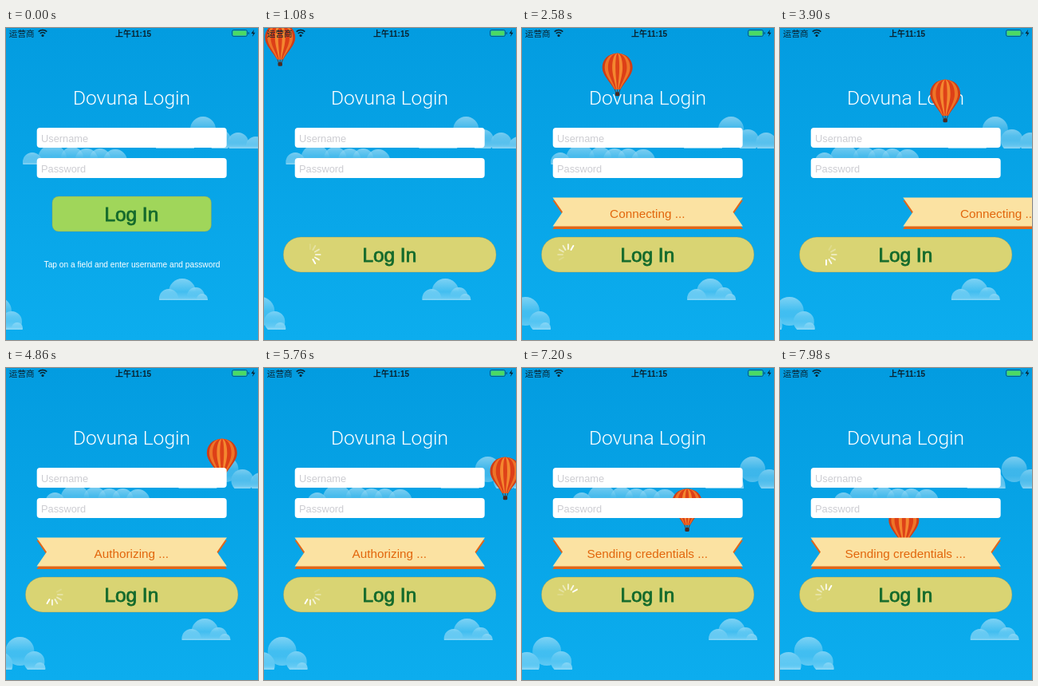
An HTML page with a canvas that plays this animation: 316 by 391 pixels, repeating every 8 s.

```html
<!DOCTYPE html>
<html lang="en">
<head>
<meta charset="utf-8">
<title>Login animation</title>
<style>
  html, body { margin: 0; width: 100%; height: 100%; overflow: hidden; background: #05a3e5; }
  canvas { display: block; }
</style>
</head>
<body>
<canvas id="stage" width="316" height="391"></canvas>
<script>
const ctx = document.getElementById('stage').getContext('2d');
const W = 316, H = 391, LOOP = 8;
const SANS = '"Liberation Sans", Arial, sans-serif';
const CJK = '"Noto Sans CJK SC", "Noto Sans CJK", sans-serif';

const TAP = 0.15;          // login button is pressed
const RATE = 1 / 0.9;      // playback speed of the interface
const FIRST_MESSAGE = 1.66;
const FLIP = 0.3, HOLD = 1.818, EXIT = 0.3;
const MESSAGES = ['Connecting ...', 'Authorizing ...', 'Sending credentials ...'];

// Clouds: baseline, top, and bumps as [x, y, radius]
const CLOUDS = [
  { base: 151, top: 111, bumps: [[212, 149, 24], [247, 127, 16], [268, 141, 14], [291, 144, 13], [313, 148, 12], [334, 150, 12]] },
  { base: 171, top: 146, bumps: [[33, 168, 12], [58, 164, 18], [83, 163, 14], [101, 165, 14], [118, 164, 13], [137, 167, 15]] },
  { base: 341, top: 314, bumps: [[204, 339, 12], [221, 331, 17], [238, 336, 11], [246, 340, 7]] },
  { base: 378, top: 337, bumps: [[-36, 372, 16], [-11, 355, 18], [7, 368, 13], [14, 376, 7]] }
];
const CLOUD_SPEED = 5.85;

const clamp = v => Math.max(0, Math.min(1, v));
const mix = (a, b, p) => a + (b - a) * p;
const smooth = p => p * p * (3 - 2 * p);

function spring(time, damping, duration) {
  if (time <= 0) return 0;
  const decay = 6.9 / duration;
  const freq = decay / damping * Math.sqrt(1 - damping * damping);
  return 1 - Math.exp(-decay * time) * (Math.cos(freq * time) + decay / freq * Math.sin(freq * time));
}

function text(str, x, y, font, color, align = 'left') {
  ctx.font = font;
  ctx.fillStyle = color;
  ctx.textAlign = align;
  ctx.fillText(str, x, y);
}

function box(x, y, w, h, r, fill, stroke) {
  ctx.beginPath();
  ctx.roundRect(x, y, w, h, r);
  if (fill) { ctx.fillStyle = fill; ctx.fill(); }
  if (stroke) { ctx.strokeStyle = stroke; ctx.lineWidth = 1; ctx.stroke(); }
}

function poly(points, fill) {
  ctx.beginPath();
  points.forEach(([x, y]) => ctx.lineTo(x, y));
  ctx.closePath();
  ctx.fillStyle = fill;
  ctx.fill();
}

function fade(top, bottom, ...stops) {
  const gradient = ctx.createLinearGradient(0, top, 0, bottom);
  stops.forEach(([at, color]) => gradient.addColorStop(at, color));
  return gradient;
}

const white = alpha => `rgba(255,255,255,${alpha})`;

function drawSky() {
  ctx.fillStyle = fade(0, H, [0, '#039ce0'], [1, '#0cadee']);
  ctx.fillRect(0, 0, W, H);
}

function drawCloud({ base, top, bumps }, shift) {
  ctx.save();
  ctx.beginPath();
  ctx.rect(0, 0, W, base);
  ctx.clip();
  ctx.translate(shift, 0);
  ctx.beginPath();
  for (const [x, y, r] of bumps) {
    ctx.moveTo(x + r, y);
    ctx.arc(x, y, r, 0, 2 * Math.PI);
  }
  ctx.fillStyle = fade(top, base, [0, white(0.24)], [0.6, white(0.22)], [0.9, white(0.36)], [1, white(0.55)]);
  ctx.fill();
  // Each bump has its own bright crown
  for (const [x, y, r] of bumps) {
    ctx.beginPath();
    ctx.arc(x, y, r, 0, 2 * Math.PI);
    ctx.fillStyle = fade(y - r, y, [0, white(0.3)], [1, white(0)]);
    ctx.fill();
  }
  ctx.restore();
}

function drawBalloon(t) {
  const leg = (t - TAP) / 5.4;
  if (leg < 0) return;
  const x = leg < 1 ? mix(-42, 316, leg) : mix(316, -42, leg - 1);
  const y = leg < 1 ? mix(0, 135, leg) : mix(135, 284, leg - 1);
  ctx.save();
  ctx.translate(x + 0.5, y - 29);
  ctx.strokeStyle = '#5b2a1c';
  ctx.lineWidth = 0.8;
  ctx.beginPath();
  for (const side of [-1, 0, 1]) {
    ctx.moveTo(side * 4, 43);
    ctx.lineTo(side * 2, 49);
  }
  ctx.stroke();
  // Nested narrowing envelopes form the stripes
  const stripes = [[1, '#cf3d16'], [0.84, '#ee7428'], [0.62, '#dd3f17'], [0.34, '#f4872f'], [0.13, '#de4218']];
  for (const [k, color] of stripes) {
    ctx.beginPath();
    ctx.moveTo(0, 0);
    ctx.bezierCurveTo(12 * k, 0, 19 * k, 8, 19 * k, 18);
    ctx.bezierCurveTo(19 * k, 27, 9 * k, 36, 4 * k, 45);
    ctx.lineTo(-4 * k, 45);
    ctx.bezierCurveTo(-9 * k, 36, -19 * k, 27, -19 * k, 18);
    ctx.bezierCurveTo(-19 * k, 8, -12 * k, 0, 0, 0);
    ctx.fillStyle = color;
    ctx.fill();
  }
  box(-2.7, 48.5, 5.4, 5, 1.5, '#4a2a22');
  ctx.restore();
}

function drawStatusBar() {
  const ink = '#0a2330';
  text('运营商', 3.8, 10.8, `500 10.6px ${CJK}`, ink);
  text('上午11:15', 159.5, 10.5, `bold 10px "Liberation Sans", ${CJK}`, ink, 'center');
  ctx.strokeStyle = ink;
  ctx.lineWidth = 1.7;
  for (const r of [4.5, 7.5]) {
    ctx.beginPath();
    ctx.arc(46, 10, r, -Math.PI * 0.75, -Math.PI * 0.25);
    ctx.stroke();
  }
  ctx.beginPath();
  ctx.arc(46, 9.5, 1.6, 0, 2 * Math.PI);
  ctx.fill();
  box(283.5, 2.5, 19, 8, 2, null, 'rgba(10,35,48,.5)');
  box(284.5, 3.5, 17, 6, 1, '#4cd964');
  box(303.5, 5, 1.5, 3, 0.7, 'rgba(10,35,48,.5)');
  poly([[311, 2], [307.5, 7], [310, 7], [309, 11], [312.5, 5.8], [310.2, 5.8]], ink);
}

function drawField(label, y) {
  box(38.7, y, 238, 25, 4, '#fff');
  text(label, 44, y + 17.5, `12.8px ${SANS}`, '#cdcdd2');
}

function drawSpinner(x, y, t, alpha) {
  const head = Math.floor(1 + 12 * (t - 2.58) / 0.9 + 0.001);
  ctx.save();
  ctx.translate(x, y);
  ctx.strokeStyle = '#fff';
  ctx.lineWidth = 1.9;
  ctx.lineCap = 'round';
  for (let i = 0; i < 12; i++) {
    const age = (((head - i) % 12) + 12) % 12;
    const angle = i * Math.PI / 6;
    const dx = Math.sin(angle), dy = -Math.cos(angle);
    ctx.globalAlpha = alpha * Math.max(0, 1 - age / 6);
    ctx.beginPath();
    ctx.moveTo(dx * 7, dy * 7);
    ctx.lineTo(dx * 12.8, dy * 12.8);
    ctx.stroke();
  }
  ctx.restore();
}

function drawButton(t) {
  const time = (t - TAP) * RATE;
  const width = 199.5 + 67 * spring(time, 0.2, 1.5);
  const drop = spring(time, 0.7, 0.33);
  const tint = clamp(time / 0.5);
  const reveal = clamp(time / 0.33);
  const left = 157.7 - width / 2, top = 211 + 51 * drop;
  const color = [[160, 217], [214, 212], [90, 115]].map(([a, b]) => Math.round(mix(a, b, tint)));
  box(left, top, width, 44, mix(8, 21.5, reveal), `rgb(${color})`, 'rgba(150,140,80,.35)');
  text('Log In', 157.3, top + 31, `24.4px ${SANS}`, '#146a2c', 'center');
  ctx.strokeStyle = '#146a2c';
  ctx.lineWidth = 0.85;
  ctx.strokeText('Log In', 157.3, top + 31);
  if (reveal > 0) {
    drawSpinner(left + mix(-17, 33.5, drop), top + mix(5, 22, drop), t, reveal);
  }
}

function drawBanner(t) {
  const period = FLIP + HOLD + EXIT;
  const index = Math.floor((t - FIRST_MESSAGE) / period);
  if (index < 0) return;
  const time = t - FIRST_MESSAGE - index * period;
  const turn = clamp(time / FLIP);
  if (turn <= 0.5) return;
  const ribbon = drop => [[38.5, -20], [277, -20], [264.5, -2], [277, 16], [38.5, 16], [51, -2]].map(([x, y]) => [x, y + drop]);
  ctx.save();
  ctx.translate(W * smooth(clamp((time - FLIP - HOLD) / EXIT)), 232.5);
  ctx.scale(1, Math.sin((turn - 0.5) * Math.PI));
  poly(ribbon(3.5), '#e0661a');
  poly(ribbon(0), '#fbe2a2');
  text(MESSAGES[index], 157.3, 5.8, `15.3px ${SANS}`, '#e2660c', 'center');
  ctx.restore();
}

function draw(t) {
  drawSky();
  for (const cloud of CLOUDS) drawCloud(cloud, CLOUD_SPEED * t);
  text('Dovuna Login', 157.5, 96, '300 24.6px Roboto, sans-serif', '#fff', 'center');
  text('Tap on a field and enter username and password', 158, 300, `10.2px ${SANS}`, '#fff', 'center');
  drawBalloon(t);
  drawField('Username', 125);
  drawField('Password', 163);
  drawButton(t);
  drawBanner(t);
  drawStatusBar();
}

const start = performance.now();
function tick() {
  draw((performance.now() - start) / 1000 % LOOP);
  requestAnimationFrame(tick);
}
tick();
</script>
</body>
</html>
```
